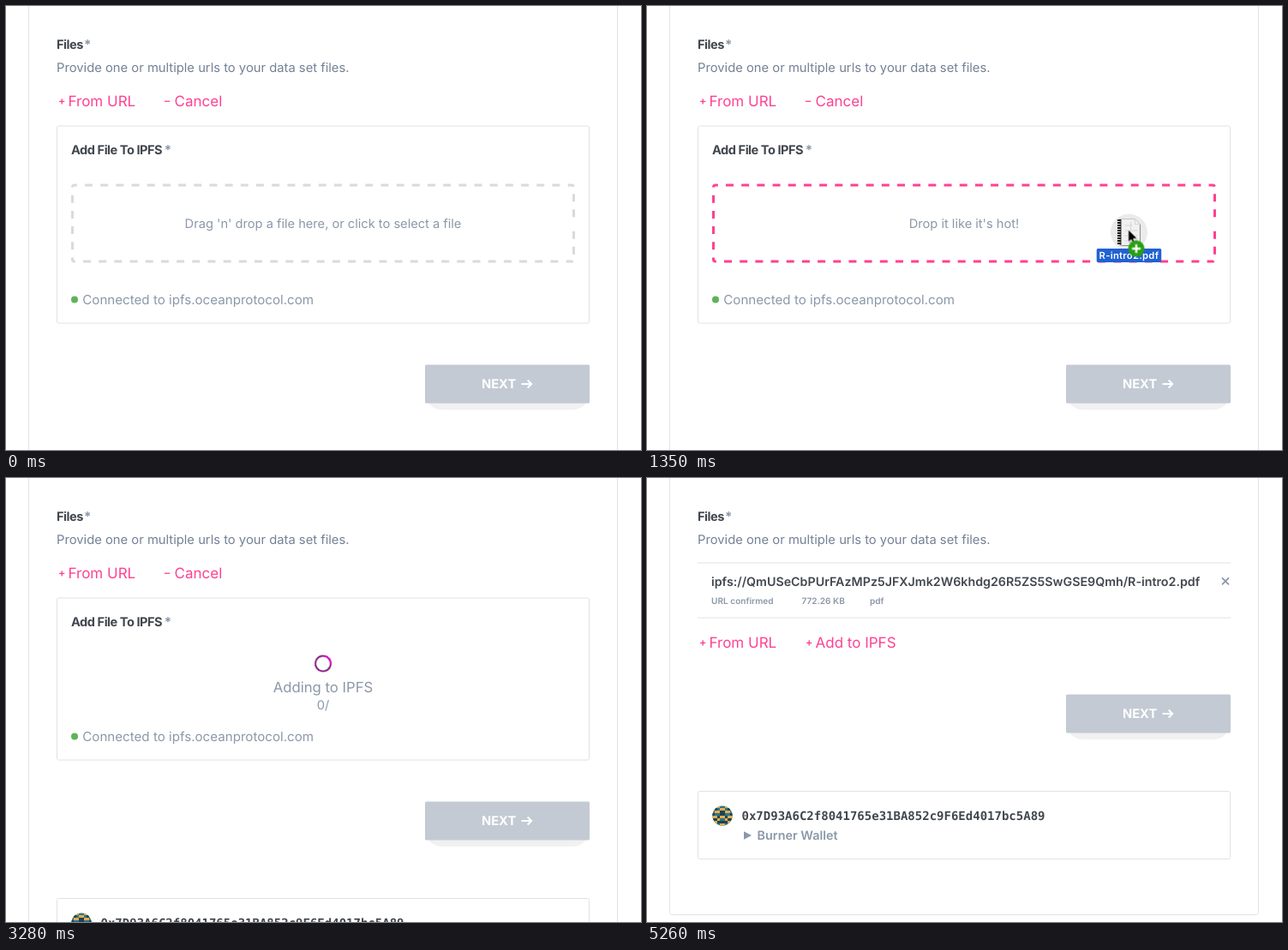
Recreate the animation shown at these times as an HTML page. Size 741 px wide and 518 px high, loop 6.37 s.

```html
<!DOCTYPE html>
<html lang="en">
<head>
<meta charset="utf-8">
<title>Add a file to IPFS</title>
<style>
html, body { margin: 0; width: 100%; height: 100%; overflow: hidden; background: #fff; }
svg { display: block; width: 741px; height: 518px; }
text { font-family: Inter, "Open Sans", sans-serif; font-size: 14.65px; fill: #8b98a9; text-rendering: geometricPrecision; }

.title { font-weight: 700; font-size: 14.6px; letter-spacing: -.47px; fill: #41474e; }
.star { font-weight: 700; font-size: 15px; }
.help { font-size: 14.78px; fill: #748196; }
.link { font-size: 17px; fill: #ff4092; }
.sign { font-size: 12.5px; font-weight: 600; fill: #ff4092; }
.mid { text-anchor: middle; }
.big { font-size: 16.7px; }
.node { font-size: 15.13px; }
.url { font-size: 14.25px; font-weight: 600; fill: #41474e; }
.meta { font-size: 10.1px; font-weight: 600; }
.next { font-size: 14.7px; font-weight: 700; fill: #fff; }
.hash { font: 700 14px "DejaVu Sans Mono", monospace; fill: #41474e; }
.wallet { font-size: 14.4px; font-weight: 600; }
.label { font-size: 11.2px; font-weight: 600; letter-spacing: .3px; fill: #fff; }
.line { fill: none; stroke: #e2e2e2; }

/* hard cuts */
.cut { animation: 6.37s step-end infinite; }
.form { animation-name: form; }
.drop { animation-name: drop; }
.idle { animation-name: idle; }
.hot { animation-name: hot; }
.adding { animation-name: adding; }
.checking { animation-name: checking; }
.busy { animation-name: busy; }
.done { animation-name: done; }
.below { animation-name: below; }
@keyframes form { 0% { opacity: 1 } 68.13%, 100% { opacity: 0 } }
@keyframes drop { 0% { opacity: 1 } 37.833%, 100% { opacity: 0 } }
@keyframes idle { 0% { opacity: 1 } 17.42%, 100% { opacity: 0 } }
@keyframes hot { 0% { opacity: 0 } 17.42% { opacity: 1 } 37.833%, 100% { opacity: 0 } }
@keyframes adding { 0% { opacity: 0 } 37.833% { opacity: 1 } 58.084%, 100% { opacity: 0 } }
@keyframes checking { 0% { opacity: 0 } 58.084% { opacity: 1 } 68.13%, 100% { opacity: 0 } }
@keyframes busy { 0% { opacity: 0 } 37.833% { opacity: 1 } 68.13%, 100% { opacity: 0 } }
@keyframes done { 0% { opacity: 0 } 68.13%, 100% { opacity: 1 } }
@keyframes below {
  0% { transform: none }
  37.833% { transform: translateY(-41px) }
  58.084% { transform: translateY(-61px) }
  68.13%, 100% { transform: translateY(-166px) }
}

/* continuous motion */
.zone, .file, .cursor, .spin { animation: 6.37s linear infinite; }
/* the outer edge is stroked at double width and clipped to its inner half */
.zone { animation-name: zone; fill: none; stroke-width: 6; stroke-dasharray: 9 9.18; stroke-dashoffset: 9; }
.file { animation-name: file; }
.cursor { animation-name: cursor; }
.spin { animation-name: spin; transform-origin: 370px 216.5px; }
@keyframes zone {
  0%, .93% { stroke: #dadada }
  .94%, 17.42% { stroke: #e2e2e2 }
  20.5%, 100% { stroke: #ff4092 }
}
@keyframes file {
  0%, 15.53% { opacity: 0; transform: translate(745.5px, 193px) }
  15.54% { opacity: .72; transform: translate(745.5px, 193px); animation-timing-function: cubic-bezier(.3,.4,.5,1) }
  21.193% { opacity: 1; transform: translate(562.5px, 264px); animation-timing-function: ease-out }
  24.96% { transform: translate(554.5px, 270px) }
  28.57%, 37.832% { opacity: 1; transform: translate(554px, 269px) }
  37.833%, 100% { opacity: 0; transform: translate(554px, 269px) }
}
@keyframes cursor {
  0%, 15.53% { opacity: 0; transform: translate(735.5px, 194px) }
  15.54% { opacity: 1; transform: translate(735.5px, 194px); animation-timing-function: cubic-bezier(.3,.4,.5,1) }
  21.193% { transform: translate(561.5px, 260.5px); animation-timing-function: ease-out }
  24.96% { transform: translate(557px, 265.5px) }
  28.57%, 43.17% { transform: translate(556.5px, 264.5px); animation-timing-function: ease-in-out }
  52.59% { opacity: 1; transform: translate(746px, 205px) }
  52.6%, 100% { opacity: 0; transform: translate(746px, 205px) }
}
@keyframes spin { from { transform: rotate(-114deg) } to { transform: rotate(3708deg) } }
</style>
</head>
<body>
<svg viewBox="0 0 741 518">
  <defs>
    <path id="edge" d="M664 253.5V295.5a4 4 0 0 1-4 4H80a4 4 0 0 1-4-4V211.5a4 4 0 0 1 4-4H660a4 4 0 0 1 4 4z"/>
    <clipPath id="inside"><use href="#edge"/></clipPath>
    <clipPath id="round"><circle r="11.6"/></clipPath>
    <path id="half" d="M-12-9h3v3h-3zM-6-12h3v3h-3zM-9-6h6v3h-6zM-3-9h3v3h-3zM-12 0h6v3h-6zM-3 0h3v3h-3zM-9 6h3v3h-3zM-6 3h3v3h-3zM-3 9h3v3h-3z"/>
    <path id="dark" d="M-9-9h3v3h-3zM-3-6h3v6h-3zM-12-3h3v3h-3zM-6 0h3v3h-3zM-12 3h6v3h-6zM-6 6h6v3h-6z"/>
  </defs>

  <text class="title" x="59" y="49.5">Files</text>
  <text class="star" x="91" y="50">*</text>
  <text class="help" x="59" y="76.5">Provide one or multiple urls to your data set files.</text>

  <g class="cut form">
    <text class="sign" x="61" y="115.3">+</text>
    <text class="link" x="72.5" y="116.7">From URL</text>
    <text class="sign" x="185" y="115.3">–</text>
    <text class="link" x="196.5" y="116.7">Cancel</text>
    <text class="title" x="76" y="172.5">Add File To IPFS</text>
    <text class="star" x="184.8" y="173">*</text>
  </g>

  <g class="cut drop">
    <rect class="line" x="59.5" y="140" width="621" height="230" rx="2"/>
    <g clip-path="url(#inside)"><use class="zone" href="#edge"/></g>
    <text class="mid cut idle" x="370" y="258.7">Drag 'n' drop a file here, or click to select a file</text>
    <text class="mid cut hot" x="370" y="258.7">Drop it like it's hot!</text>
  </g>

  <g class="cut busy">
    <g class="spin" fill="none" stroke-width="2">
      <circle cx="370" cy="216.5" r="9" stroke="#7b1173"/>
      <path d="M363.64 210.14a9 9 0 0 1 12.72 0" stroke="#e000cf"/>
    </g>
  </g>
  <g class="cut adding">
    <rect class="line" x="59.5" y="140" width="621" height="189" rx="2"/>
    <text class="mid big" x="370" y="249.7">Adding to IPFS</text>
    <text class="mid" x="370" y="269.7">0/</text>
  </g>
  <g class="cut checking">
    <rect class="line" x="59.5" y="140" width="621" height="169" rx="2"/>
    <text class="mid big" x="370" y="249.7">Checking IPFS gateway URL</text>
  </g>

  <g class="cut done">
    <path class="line" d="M59 99H681M59 163H681"/>
    <text class="url" x="75" y="126">ipfs://QmUSeCbPUrFAzMPz5JFXJmk2W6khdg26R5ZS5SwGSE9Qmh/R-intro2.pdf</text>
    <text class="meta" x="75" y="147">URL confirmed</text>
    <text class="meta" x="180.5" y="147">772.26 KB</text>
    <text class="meta" x="260" y="147">pdf</text>
    <path d="M671 116.3l8 8m0-8l-8 8" stroke="#8b98a9" stroke-width="1.8"/>
    <text class="sign" x="61" y="196.3">+</text>
    <text class="link" x="72.5" y="197.7">From URL</text>
    <text class="sign" x="185" y="196.3">+</text>
    <text class="link" x="196.5" y="197.7">Add to IPFS</text>
  </g>

  <g class="cut below">
    <rect class="line" x="26.5" y="-300" width="687" height="975.5" rx="3"/>
    <g class="cut form">
      <circle cx="80" cy="342.5" r="4" fill="#5fb359"/>
      <text class="node" x="89.3" y="347.7">Connected to ipfs.oceanprotocol.com</text>
    </g>
    <rect x="489" y="426" width="192" height="45" rx="20" fill="#f1f1f1"/>
    <rect x="489" y="418.5" width="192" height="45" rx="1.5" fill="#c3cad4"/>
    <text class="next" x="555" y="446.4">NEXT</text>
    <path d="M601.5 441h11.5m-4.3-4.5l4.5 4.5-4.5 4.5" fill="none" stroke="#fff" stroke-width="2"/>

    <rect class="line" x="59.5" y="531.5" width="621" height="79" rx="2"/>
    <g transform="translate(88 560)" clip-path="url(#round)">
      <rect x="-12" y="-12" width="24" height="24" fill="#2f7585"/>
      <g fill="#e5ad4c"><use href="#half"/><use href="#half" transform="scale(-1 1)"/></g>
      <g fill="#1d4459"><use href="#dark"/><use href="#dark" transform="scale(-1 1)"/></g>
    </g>
    <text class="hash" x="110.5" y="565">0x7D93A6C2f8041765e31BA852c9F6Ed4017bc5A89</text>
    <path d="M113 578.3l9 4.7-9 4.7z" fill="#8b98a9"/>
    <text class="wallet" x="128.5" y="588">Burner Wallet</text>
  </g>

  <g class="file">
    <circle r="21.5" fill="#ebebeb"/>
    <path d="M-11-15.5H7l6 6V15.5H-11z" fill="#f1f1f1" stroke="#c6c6c6"/>
    <path d="M7-15.5v6h6M-5-8H4M-5-2H10M-5 4H10M-5 10H10M2-12V13" fill="none" stroke="#d6d6d6"/>
    <path d="M13-9V15.5H-8" fill="none" stroke="#8c8c8c"/>
    <path d="M-11.5-15V15" stroke="#111" stroke-width="4" stroke-dasharray="2 1"/>
    <path d="M-9.5-15V15" stroke="#222"/>
    <rect x="-38" y="19" width="76" height="16" rx="2" fill="#2062d2"/>
    <text class="label mid" y="31">R-intro2.pdf</text>
  </g>

  <g class="cursor">
    <path d="M1 2v15l3.5-3.2 2.4 5.6 2.8-1.2-2.4-5.4h5z" fill="#000" opacity=".18"/>
    <path d="M0 0V15.2L3.5 12l2.4 5.4 2.5-1.1-2.3-5.3h4.8z" fill="#000" stroke="#fff"/>
    <g class="cut hot">
      <circle cx="9.5" cy="22.5" r="9.5" fill="#27a012"/>
      <path d="M9.5 17.5v10m-5-5h10" stroke="#fff" stroke-width="2.4"/>
    </g>
  </g>
</svg>
</body>
</html>
```
